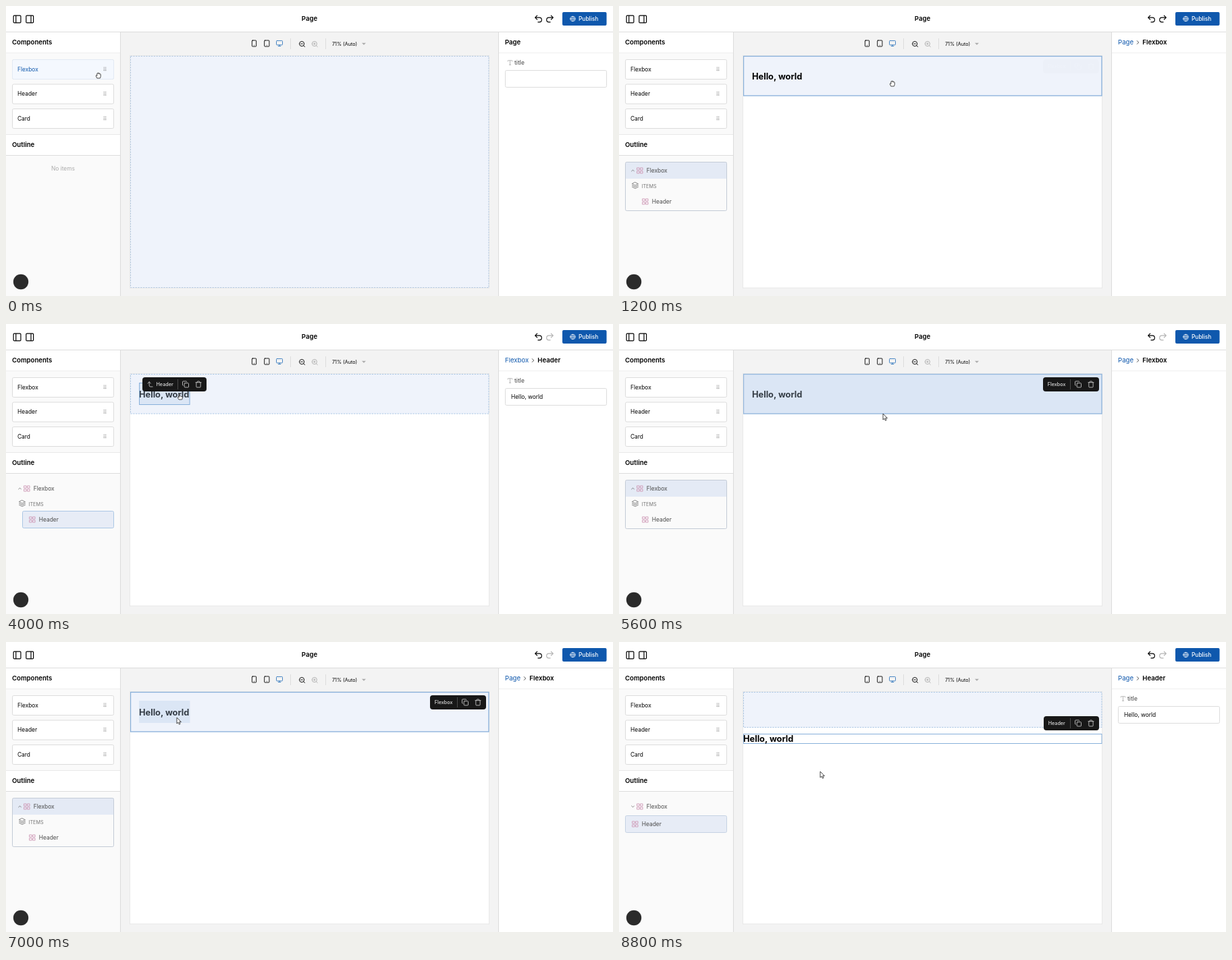
Recreate the animation shown at these times as an HTML page. Size 899 by 430 pixels, loop 9470 ms.

```html
<!DOCTYPE html>
<html lang="en">
<head>
<meta charset="utf-8">
<title>Page editor</title>
<style>
html, body { margin: 0; width: 100%; height: 100%; overflow: hidden; background: #fff; }
svg { display: block; width: 899px; height: 430px; font-family: Inter, sans-serif; }
text { white-space: pre; }
</style>
</head>
<body>
<svg viewBox="0 0 899 430">
  <defs><clipPath id="frame"><rect x="184" y="73" width="532" height="346"/></clipPath></defs>
  <g id="base"></g>
  <g id="live"></g>
</svg>
<script>
const LOOP = 9470;
const BLUE = '#0f58ad', LINE = '#dcdcdc', EDGE = '#88b0da', TINT = '#eff3fb', GREY = '#ababab';

const ICONS = {
  left: 'M5 3H19Q21 3 21 5V19Q21 21 19 21H5Q3 21 3 19V5Q3 3 5 3ZM9 3V21',
  right: 'M5 3H19Q21 3 21 5V19Q21 21 19 21H5Q3 21 3 19V5Q3 3 5 3ZM15 3V21',
  undo: 'M9 14 4 9l5-5M4 9h10.5a5.5 5.5 0 0 1 0 11H11',
  redo: 'm15 14 5-5-5-5M20 9H9.5a5.5 5.5 0 0 0 0 11H13',
  globe: 'M2 12a10 10 0 1 0 20 0a10 10 0 1 0-20 0ZM2 12H22M12 2a15 15 0 0 1 0 20a15 15 0 0 1 0-20',
  phone: 'M7 2H17Q19 2 19 4V20Q19 22 17 22H7Q5 22 5 20V4Q5 2 7 2ZM12 18h.01',
  tablet: 'M6 2H18Q20 2 20 4V20Q20 22 18 22H6Q4 22 4 20V4Q4 2 6 2ZM12 18h.01',
  monitor: 'M4 3H20Q22 3 22 5V15Q22 17 20 17H4Q2 17 2 15V5Q2 3 4 3ZM8 21h8M12 17v4',
  zoomOut: 'M3 11a8 8 0 1 0 16 0a8 8 0 1 0-16 0M21 21l-4.3-4.3M8 11h6',
  zoomIn: 'M3 11a8 8 0 1 0 16 0a8 8 0 1 0-16 0M21 21l-4.3-4.3M8 11h6M11 8v6',
  type: 'M4 7V4h16v3M9 20h6M12 4v16',
  copy: 'M10 8H20Q22 8 22 10V20Q22 22 20 22H10Q8 22 8 20V10Q8 8 10 8ZM4 16Q2 16 2 14V4Q2 2 4 2H14Q16 2 16 4',
  trash: 'M3 6h18M19 6v14q0 2-2 2H7q-2 0-2-2V6M8 6V4q0-2 2-2h4q2 0 2 2v2',
  parent: 'M14 9 9 4 4 9M20 20h-7a4 4 0 0 1-4-4V4',
  grid: 'M3 3h7v7H3ZM14 3h7v7h-7ZM14 14h7v7h-7ZM3 14h7v7H3Z',
  layers: 'M12 2 22 7 12 12 2 7ZM22 12 12 17 2 12M22 17 12 22 2 17',
  up: 'm18 15-6-6-6 6',
  down: 'm6 9 6 6 6-6',
  next: 'm9 18 6-6-6-6'
};

const CURSORS = {
  arrow: 'M-3-5V4L-1 2.2 .5 5.2 2 4.5 .6 1.6H3.4Z',
  open: 'M-2.2 4C-3 2.5-4 1-3.8 .2-3.4-.4-2.6 0-2.2 .6V-2.6C-2.2-3.6-.9-3.6-.9-2.6V-3.2C-.9-4.2 .5-4.2 .5-3.2V-2.6C.6-3.5 1.8-3.4 1.8-2.6V-1.8C2-2.6 3.2-2.4 3.2-1.5V1.2C3.2 2.6 2.6 3.2 2.3 4Z',
  fist: 'M-2 3.4C-3 2-3.4 1-3 0-2.8-.8-2.2-.8-2-.2V-1.6C-1.8-2.6-.6-2.6-.5-2-.2-2.8 .9-2.7 1-2 1.4-2.7 2.4-2.4 2.5-1.6 3-1.8 3.4-1.4 3.3-.6 3.3 1.5 2.6 2 2.3 3.4Z',
  point: 'M-2 4C-3 2.5-4 1-3.6 .4-3-.2-2.2 .4-1.8 1V-3.6C-1.8-4.6-.5-4.6-.5-3.6V-1C.2-1.4 .8-1.2 1-.7 1.6-1 2.2-.7 2.3-.2 3-.3 3.4 .2 3.3 .8V2C3.3 3 2.8 3.4 2.6 4Z'
};

// Drawing helpers; text is centred vertically on its capitals.
const rect = (x, y, w, h, fill = 'none', stroke = 'none', r = 0, more = '') =>
  `<rect x="${x}" y="${y}" width="${w}" height="${h}" rx="${r}" fill="${fill}" stroke="${stroke}" ${more}/>`;
const dashed = (x, y, w, h, fill, stroke) => rect(x, y, w, h, fill, stroke, 0, 'stroke-dasharray="2.4 1.4"');
const text = (x, cy, str, size = 8.4, fill = '#000', weight = 400, more = '') =>
  `<text x="${x}" y="${cy + size * .364}" font-size="${size}" fill="${fill}" font-weight="${weight}" ${more}>${str}</text>`;
const icon = (name, cx, cy, size = 10.8, color = '#000', width = 2) =>
  `<path d="${ICONS[name]}" transform="translate(${cx - size / 2} ${cy - size / 2}) scale(${size / 24})" fill="none"
    stroke="${color}" stroke-width="${width}" stroke-linecap="round" stroke-linejoin="round"/>`;
const fadeGroup = (opacity, body) => opacity > 0 ? `<g opacity="${opacity}">${body}</g>` : '';

function dots(cx, cy, s = 1) {
  let out = '';
  for (let i = 0; i < 6; i++)
    out += `<circle cx="${cx + (i % 2 - .5) * 2.4 * s}" cy="${cy + ((i >> 1) - 1) * 2.2 * s}" r="${.65 * s}" fill="#767676"/>`;
  return out;
}

function drawerItem(x, y, label, active) {
  return rect(x + .5, y + .5, 150, 29, active ? '#f4f8fe' : '#fff', active ? '#e2eaf4' : LINE, 2) +
    text(x + 8, y + 14.6, label, 8.4, active ? BLUE : '#000') + dots(x + 137.5, y + 14.3);
}

function actionBar(x, y, w, label, parent) {
  const r = x + w, cy = y + 10.4;
  return rect(x, y, w, 21, '#181818', 'none', 4) +
    (parent ? icon('parent', x + 11.5, cy, 10.8, parent) : '') +
    text(x + (parent ? 20.5 : 6.7), cy, label, 7.2, '#dcdcdc', 500) +
    rect(r - 43, y + 3, 1, 15, '#4a4a4a') +
    icon('copy', r - 31, cy, 10.8, '#c3c3c3') + icon('trash', r - 12, cy, 10.8, '#c3c3c3');
}

// Timing helpers
const clamp = v => Math.min(1, Math.max(0, v));
const ramp = (t, a, b) => clamp((t - a) / (b - a));
const smooth = u => u * u * (3 - 2 * u);
const mix = (a, b, u) => a + (b - a) * u;

const PATH = [
  [0, 137, 103], [70, 137, 103], [420, 290, 122], [800, 405, 115], [1470, 405, 115], [1730, 431, 118],
  [1870, 428, 118], [2130, 351, 118], [2530, 258, 108], [4000, 258, 108], [4470, 214, 90], [5000, 214, 90],
  [5530, 394, 138], [5650, 394, 138], [5930, 352, 127], [6130, 352, 127], [6670, 256, 117],
  [7070, 256, 117], [7800, 301, 197], [LOOP, 301, 197]
];

function pointer(t) {
  const i = PATH.findIndex(p => p[0] > t);
  const [t0, x0, y0] = PATH[i - 1], [t1, x1, y1] = PATH[i];
  const u = smooth(ramp(t, t0, t1));
  return [mix(x0, x1, u), mix(y0, y1, u)];
}

function cursorKind(t) {
  if (t < 100) return 'open';
  if (t < 1130) return 'fist';
  if (t < 2500) return 'open';
  if (t < 5100) return 'point';
  if (t < 7070) return 'arrow';
  return t < 8000 ? 'fist' : 'arrow';
}

function fields(t) {
  const headerOn = t >= 3070 && t < 4670 || t >= 7130;
  const crumbs = (first, x, last) => text(739, 54, first, 9.6, BLUE) +
    icon('next', x, 54, 9.6, '#222') + text(x + 6.8, 54, last, 9.6, '#000', 600);
  let out;
  if (t < 1200) out = text(739, 54, 'Page', 9.6, '#000', 600);
  else if (!headerOn) return crumbs('Page', 768.5, 'Flexbox');
  else out = t < 8070 ? crumbs('Flexbox', 780.5, 'Header') : crumbs('Page', 768.5, 'Header');
  return out + icon('type', 746.5, 84, 9.6, GREY) + text(753, 84, 'title', 8.4, '#5a5a5a', 500) +
    rect(739.5, 95.5, 150, 25, '#fff', LINE, 2) + (headerOn ? text(748, 108, 'Hello, world') : '');
}

function outline(t) {
  if (t < 1200) return text(84.5, 240.5, 'No items', 8.4, GREY, 400, 'text-anchor="middle"');
  const row = (x, cy, label) => icon('grid', x, cy, 10.8, '#d09bb8') + text(x + 9.8, cy, label, 8.4, '#4a4a4a');
  const flex = chevron => icon(chevron, 20.5, 244, 7.6, '#4a4a4a') + row(31, 244, 'Flexbox');
  if (t >= 8070)
    return rect(9.5, 257.5, 150, 25, '#e7ecf6', '#c5d2e3', 2) + flex('down') + row(24, 270, 'Header');
  const headerOn = t >= 3070 && t < 4670 || t >= 7130;
  return (headerOn ? rect(24.5, 277.5, 135, 25, '#e7ecf6', '#abc7e5', 2)
    : rect(10, 231.5, 149.5, 24.5, '#e4eaf5') + rect(9.5, 231.5, 150, 72, 'none', '#c3cbd6', 2)) +
    flex('up') + icon('layers', 24, 266, 10.8, '#767676') +
    text(33.5, 267, 'ITEMS', 7.2, '#767676') + row(39, 290, 'Header');
}

const hello = (x, y) => text(x, y, 'Hello, world', 12.8, '#000', 700);
const veil = (x, y, w, h, opacity) => rect(x, y, w, h, '#abc7e5', 'none', 0, `opacity="${opacity * .3}"`);

function addFlexbox(t, x, y) {
  const inside = x > 230;
  let out = dashed(184.5, 74.5, 530.5, 343, inside ? '#fff' : TINT, inside ? '#8fabcb' : '#b3c8e0');
  if (!inside) return out;
  const drop = smooth(ramp(t, 1000, 1150));
  const bx = mix(x - 291, 184, drop), by = mix(y - 19, 74, drop);
  return out + rect(184, 74, 531, 21, '#d0ddef') +
    rect(bx + .5, by + .5, 530, 20.5, '#fff', LINE, 1) + text(bx + 6, by + 10.5, 'Flexbox', 6) +
    dots(bx + 521.5, by + 10, .75);
}

function moveHeader(t, x, y) {
  const out = y > 150;
  let s = dashed(184.5, 74.5, 530.5, 343, '#fff', '#8fabcb') +
    dashed(184.5, 74.5, 530.5, out ? 52 : 58.5, TINT, '#abc7e5') +
    (out ? rect(184, 136, 531, 15, '#d0ddef') : rect(197, 87, 75.5, 33, '#d0ddef'));
  const drop = smooth(ramp(t, 8000, 8150));
  const hx = mix(x - 59, 184, drop), hy = mix(y - 30, 127, drop);
  return s + veil(hx, hy, 75.5, 33, 1 - drop) + hello(hx, hy + 17);
}

function canvas(t, x, y) {
  if (t < 1170) return addFlexbox(t, x, y);
  if (t >= 7130 && t < 8170) return moveHeader(t, x, y);
  if (t >= 8170)
    return dashed(184.5, 74.5, 530.5, 52, TINT, '#abc7e5') + rect(184.5, 136.5, 530.5, 14, 'none', EDGE) +
      hello(184, 143.7) + fadeGroup(ramp(t, 8270, 8600), actionBar(629, 110, 82, 'Header'));

  const headerOn = t >= 3070 && t < 4670;
  const flexHover = ramp(t, 4730, 4930) * (1 - ramp(t, 6130, 6330));
  const headerHover = t < 4670 ? ramp(t, 2400, 2530) : ramp(t, 6470, 6600);
  let out = headerOn ? dashed(184.5, 74.5, 530.5, 58.5, TINT, '#abc7e5')
    : rect(184.5, 74.5, 530.5, 58.5, TINT, EDGE, 0, 'stroke-width="1.3"');
  out += hello(197, 104) + veil(184, 74, 531, 59, flexHover) + veil(197, 87, 75.5, 33, headerHover);
  if (headerOn)
    return out + rect(197.5, 87.5, 74.5, 32, 'none', EDGE) +
      fadeGroup(ramp(t, 3070, 3270), actionBar(202, 79, 95, 'Header', t > 4350 ? '#88b0da' : '#c3c3c3'));
  return out + fadeGroup(t < 3000 ? ramp(t, 1200, 1330) : ramp(t, 4670, 4870), actionBar(628, 79, 83, 'Flexbox'));
}

function draw(t) {
  const [x, y] = pointer(t);
  const carried = t < 1000 && x <= 230;
  return icon('redo', 805.5, 19, 14.4, t < 1600 ? '#000' : '#b4b4b4') + outline(t) + fields(t) +
    `<g clip-path="url(#frame)">${canvas(t, x, y)}</g>` +
    (carried ? drawerItem(x - 128, y - 24, 'Flexbox', true) : '') +
    `<path d="${CURSORS[cursorKind(t)]}" transform="translate(${x} ${y})" fill="#fff" stroke="#333" stroke-width=".9" stroke-linejoin="round"/>`;
}

document.getElementById('base').innerHTML =
  rect(0, 0, 899, 430, '#fff') + rect(170, 39, 559, 391, '#f3f3f3') + rect(0, 39, 169, 391, '#fafafa') +
  rect(0, 39, 169, 30, '#fff') + rect(0, 191, 169, 30, '#fff') +
  rect(0, 38, 899, 1, LINE) + rect(169, 39, 1, 391, LINE) + rect(729, 39, 1, 391, LINE) +
  rect(0, 69, 169, 1, '#efefef') + rect(0, 190, 169, 1, '#e8e8e8') + rect(0, 221, 169, 1, LINE) + rect(730, 69, 169, 1, '#efefef') +
  icon('left', 16.5, 19.5, 14.4) + icon('right', 35.2, 19.5, 14.4) + icon('undo', 788.5, 19, 14.4) +
  text(449.5, 18.7, 'Page', 9.6, '#000', 600, 'text-anchor="middle"') +
  rect(824, 9, 65.5, 20, BLUE, 'none', 2) + icon('globe', 839.5, 19, 8.8, '#fff') + text(848, 19, 'Publish', 8.4, '#fff', 500) +
  text(9, 54, 'Components', 9.6, '#000', 600) + text(9, 206, 'Outline', 9.6, '#000', 600) +
  ['Flexbox', 'Header', 'Card'].map((s, i) => drawerItem(9, 79 + i * 36.5, s)).join('') +
  icon('phone', 367.5, 55.5) + icon('tablet', 386.3, 55.5) + icon('monitor', 405, 55.5, 10.8, '#3479be') +
  rect(421, 48, 1, 16, LINE) + rect(473, 48, 1, 16, LINE) +
  icon('zoomOut', 438.5, 56.5) + icon('zoomIn', 457.3, 56.5, 10.8, GREY) +
  text(483, 56, '71% (Auto)', 7.2) + `<path d="M527 54.7h6l-3 3z" fill="${GREY}"/>` +
  rect(183.5, 73.5, 532, 344.5, '#fff', '#e8e8e8') +
  '<circle cx="22" cy="409" r="11.2" fill="#2b2b2b"/>';

const live = document.getElementById('live');
function tick() {
  live.innerHTML = draw(performance.now() % LOOP);
  requestAnimationFrame(tick);
}
tick();
</script>
</body>
</html>
```
